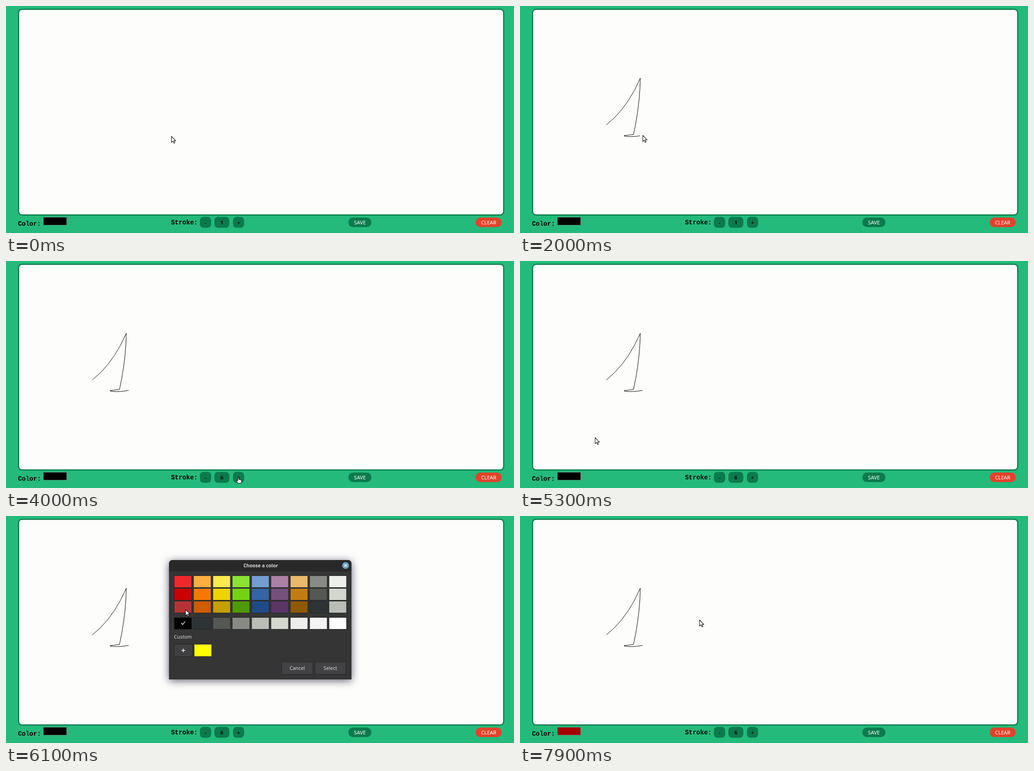
Recreate the animation shown at these times as an HTML page with a canvas. Size 1119x500 px, loop 8000 ms.

```html
<!DOCTYPE html>
<html lang="en">
<head>
<meta charset="utf-8">
<title>Drawing pad</title>
<style>
html, body { margin: 0; width: 100%; height: 100%; overflow: hidden; background: #24ba7b; }
canvas { display: block; }
</style>
</head>
<body>
<canvas id="stage" width="1119" height="500"></canvas>
<script>
const ctx = document.getElementById('stage').getContext('2d');
const LOOP = 8000, STEP = 100;
const SANS = '"Noto Sans", "Open Sans", sans-serif';
const MONO = '"Liberation Mono", monospace';
const GREEN = '#0b7b4d', RED = '#a40000', TEXT = '#dcdcdc';

const DRAW = 1000, LIFT = 2030;
const OPEN = 5400, PICK = 6400, CONFIRM = 7100, CLOSE = 7500;

// pen strokes: start point, then control and end points of quadratic curves
const PEN = [190, 262];
const CURVES = [
  [236, 226, 265, 159], [264, 220, 250, 283], [240, 284, 229, 286], [243, 290, 270, 285]
];
const BENDS = 5;

// pointer moves: start, end, x, y, upward bow
const MOVES = [
  [200, DRAW, 190, 262, 0],
  [2050, 2700, 511, 476, 110],
  [4000, 4500, 118, 478, 45],
  [4800, 5300, 165, 389, 0],
  [5400, 6100, 395, 206, 0],
  [6500, 7000, 714, 335, 0],
  [CONFIRM, 7300, 472, 295, 0],
  [7300, 7900, 395, 229, 0]
];

// light, middle and dark tone of each hue
const HUES = [
  'ef2929 cc0000 a40000', 'fcaf3e f57900 ce5c00', 'fce94f edd400 c4a000',
  '8ae234 73d216 4e9a06', '729fcf 3465a4 204a87', 'ad7fa8 75507b 5c3566',
  'e9b96e c17d11 8f5902', '888a85 555753 2e3436', 'eeeeec d3d7cf babdb6'
].map(tones => tones.split(' '));
const GREYS = ['000', ...HUES.slice(7).flatMap(tones => [...tones].reverse()), 'f3f3f3', 'fff'];
const ROWS = [0, 1, 2].map(n => [132 + 28 * n, HUES.map(tones => tones[n])]).concat([[224, GREYS]]);

const clamp = v => Math.min(1, Math.max(0, v));
const smooth = f => f * f * (3 - 2 * f);
const mix = (a, b, f) => a + (b - a) * f;

function buildSketch() {
  const points = [PEN];
  for (const [cx, cy, ex, ey] of CURVES) {
    const [x, y] = points[points.length - 1];
    for (let i = 1; i <= BENDS; i++) {
      const f = i / BENDS;
      points.push([
        mix(mix(x, cx, f), mix(cx, ex, f), f),
        mix(mix(y, cy, f), mix(cy, ey, f), f)
      ]);
    }
  }
  return points;
}
const SKETCH = buildSketch();

function sketchAt(t) {
  const n = clamp((t - DRAW) / (LIFT - DRAW)) * (SKETCH.length - 1);
  const i = Math.floor(n), a = SKETCH[i], b = SKETCH[i + 1] || a;
  return [...SKETCH.slice(0, i + 1), a.map((v, k) => mix(v, b[k], n - i))];
}

function pointerAt(t) {
  if (t > DRAW && t < MOVES[1][0]) return sketchAt(t + 50).pop();
  let x = 364, y = 287;
  for (const [from, to, ex, ey, bow] of MOVES) {
    if (t < from) break;
    if (from > LIFT && x === PEN[0]) [x, y] = SKETCH[SKETCH.length - 1];
    const f = smooth(clamp((t - from) / (to - from)));
    x = mix(x, ex, f);
    y = mix(y, ey, f) - bow * Math.sin(Math.PI * f);
  }
  return [x, y];
}

function box(x, y, w, h, r, fill, line, width = 1) {
  ctx.beginPath();
  ctx.roundRect(x, y, w, h, r);
  if (fill) { ctx.fillStyle = fill; ctx.fill(); }
  if (line) { ctx.strokeStyle = line; ctx.lineWidth = width; ctx.stroke(); }
}

function label(text, x, y, font, color, align = 'center') {
  ctx.font = font;
  ctx.fillStyle = color;
  ctx.textAlign = align;
  ctx.fillText(text, x, y);
}

function trace(points, color, width) {
  ctx.beginPath();
  points.forEach(([x, y]) => ctx.lineTo(x, y));
  ctx.strokeStyle = color;
  ctx.lineWidth = width;
  ctx.stroke();
}

function drawPage(t) {
  ctx.fillStyle = '#24ba7b';
  ctx.fillRect(0, 0, 1119, 500);
  box(27.75, 7.25, 1068.5, 453, 7.5, '#fdfdfc', GREEN, 2.5);

  label('Color:', 26.4, 484, 'bold 14px ' + MONO, '#000', 'left');
  box(82.5, 465.5, 51, 17, 0, t >= PICK ? RED : '#000', 'rgba(119,119,119,.7)');

  label('Stroke:', 363.4, 481, 'bold 14px ' + MONO, '#000', 'left');
  const clicks = Math.floor((t - 2900) / 200) + 1;
  const size = 1 + Math.min(5, Math.max(0, clicks));
  [[427, 25, '-'], [459, 33, size], [500, 24.5, '+']].forEach(([x, w, s]) => {
    box(x, 464.5, w, 24, 8, GREEN);
    label(s, x + w / 2, 480.5, 'bold 11.3px ' + SANS, '#000');
  });

  [[754, 51, 'SAVE', GREEN], [1034.5, 57.5, 'CLEAR', '#e2432a']].forEach(([x, w, s, color]) => {
    box(x, 466, w, 21, 10.5, color);
    label(s, x + w / 2, 480.5, '11.3px ' + SANS, '#fff');
  });
}

function drawPalette(t, px, py) {
  ROWS.forEach(([y, colors]) => colors.forEach((color, i) => {
    const x = 371 + i * 42.63;
    box(x - 0.5, y - 0.5, 38.5, 26, 1, null, '#252525');
    box(x, y, 37.5, 25, 0, '#' + color);
    if (px >= x && px < x + 38 && py >= y && py < y + 25) {
      box(x, y, 37.5, 25, 0, 'rgba(255,255,255,.2)');
    }
  }));
  const y = t >= PICK ? 200 : 236;
  trace([[386, y], [389, y + 3], [394.5, y - 3.5]], '#d0d0d0', 1.8);
}

function drawButton(text, x, pressed) {
  box(x, 321.5, 68.5, 27, 2, pressed ? '#323232' : '#424244', pressed ? '#111' : '#272727');
  label(text, x + 34, 339, '10.8px ' + SANS, TEXT);
}

function drawDialog(t, px, py) {
  ctx.save();
  ctx.shadowColor = 'rgba(15,10,45,.65)';
  ctx.shadowBlur = 18;
  ctx.shadowOffsetY = 3;
  box(359, 97, 402, 263, [8, 8, 0, 0], '#353535');
  ctx.restore();

  box(359, 97, 402, 25, [8, 8, 0, 0], '#292929');
  label('Choose a color', 561, 113, 'bold 10.5px ' + SANS, TEXT);
  box(740.5, 101.5, 15, 15, 7.5, '#68a3c1');
  trace([[745, 106], [751, 112]], '#fff', 1.3);
  trace([[751, 106], [745, 112]], '#fff', 1.3);

  drawPalette(t, px, py);

  label('Custom', 370, 270, '10.8px ' + SANS, TEXT, 'left');
  box(370.5, 282.5, 40, 27, 2, '#404043', '#262626');
  trace([[386.5, 296], [394.5, 296]], '#eee', 1.7);
  trace([[390.5, 292], [390.5, 300]], '#eee', 1.7);
  box(414.5, 282.5, 38.5, 27, 1, '#ff0', '#252525');

  drawButton('Cancel', 607.5, false);
  drawButton('Select', 680.5, t >= CONFIRM);
}

const ARROW = new Path2D('M0 0V13.6L3.2 10.7L5.4 15.3L7.5 14.3L5.4 9.9H9.5Z');
const HAND = new Path2D('M-1 1Q0 -1 1.2 1V5.2L6 6Q8 6.5 7.6 9L6.5 13.5H0L-4.3 8.5Q-4.5 6.6 -2.5 7.3L-1 8.5Z');

function drawPointer(x, y) {
  const shape = x > 427 && x < 525 && y > 464 && y < 489 ? HAND : ARROW;
  ctx.save();
  ctx.translate(Math.round(x) + 0.5, Math.round(y));
  ctx.lineJoin = 'round';
  ctx.strokeStyle = '#111';
  ctx.lineWidth = 1.1;
  ctx.fillStyle = '#fff';
  ctx.fill(shape);
  ctx.stroke(shape);
  ctx.restore();
}

function render(now) {
  const t = Math.floor((now % LOOP) / STEP) * STEP;
  const [x, y] = pointerAt(t);
  drawPage(t);
  if (t > DRAW) trace(sketchAt(t), '#000', 1);
  if (t >= OPEN && t < CLOSE) drawDialog(t, x, y);
  drawPointer(x, y);
}

const start = performance.now();
function tick() {
  render(performance.now() - start);
  requestAnimationFrame(tick);
}
tick();
</script>
</body>
</html>
```
